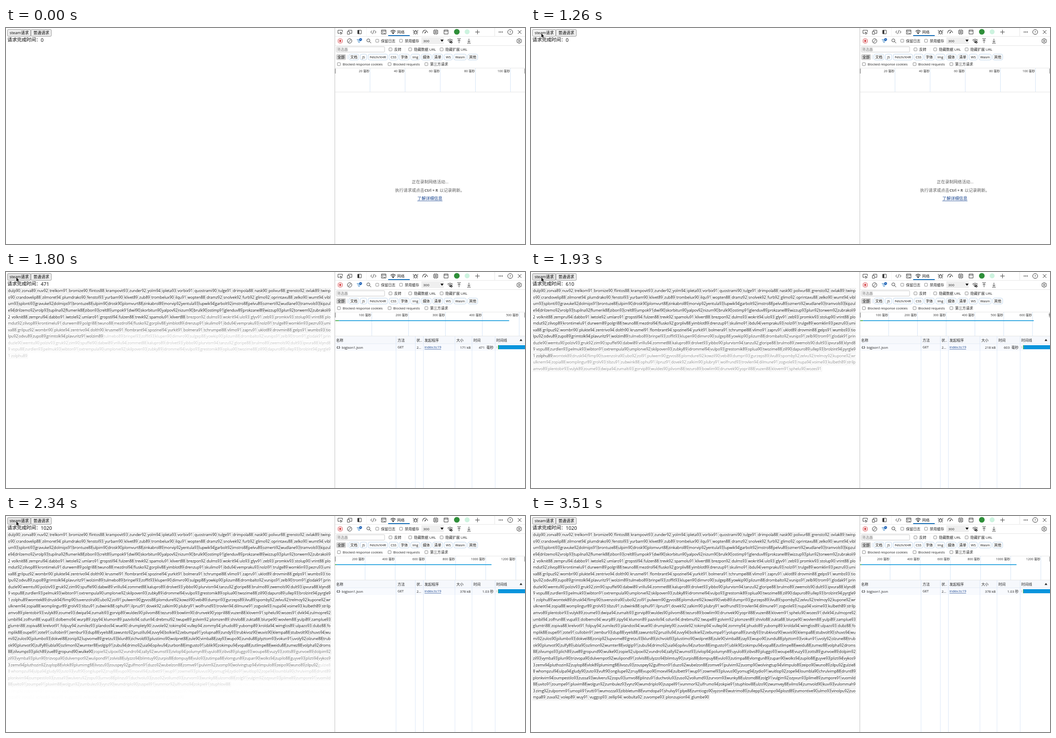
An HTML page with a canvas for the animation above (4.57 s loop, 1157 px wide and 484 px high).

```html
<!DOCTYPE html>
<html lang="zh">
<head>
<meta charset="utf-8">
<title>Network panel</title>
<style>
html, body { margin: 0; width: 100%; height: 100%; overflow: hidden; background: #fff; }
canvas { display: block; width: 1157px; height: 484px; }
</style>
</head>
<body>
<canvas id="stage"></canvas>
<script>
const W = 1157, H = 484, LOOP = 4570;
const FONT = '"Open Sans", "Noto Sans CJK SC", "Noto Sans CJK", sans-serif';
const canvas = document.getElementById('stage');
const g = canvas.getContext('2d');
const dpr = window.devicePixelRatio || 1;
canvas.width = W * dpr;
canvas.height = H * dpr;

// One line per text row; "|" ends a streamed chunk, words may break across rows.
const ROWS = `
dulp90 zorva89 nuv92 trelkom91 bromize90 flintos88 krampovit93 zunder92 yolm94 ipleta93 vorbix91 quostrami90 tulge91 drimpola88 nask90 polivur88 grensto92 ovlak89 twinp
o90 crandovelip88 zilmoret94 plumdrako90 fenstol93 yurbam90 klivet89 zub89 trombelux90 ilqu91 wopten88 dramz92 snolvek92 furb92 glimo92 oprintavu88 zelko90 wumt94 vibl
um93 splonti93 gravuke92 dolmips91 brontuze88 | ulpim90 drosk90 plomvurt88 zinkabrol89 morvip92 yentula93 lupwik94 garbolt92 imstro88 pelvu89 ozmerti92 wudlane93 tramvols93 kipzul
e94 drilzemo92 vrolp93 tupilna92 flumerik88 zibon93 crelt89 umpok91 dwil90 skorbitun90 yalpov92 nizum90 brulk90 ostimp91 glenduv89 prokzanel89 wizzup93 plun92 torwem92 zubrakoli9
2 volknit88 zemprul94 dabbo91 iwtole92 umlaro91 gropstil94 fulzen88 trevk92 spamolu91 klivert88 | brezpon92 dulms93 wokrit94 ulo93 glyv91 zeb93 promkiv93 stolup90 vrint88 plo
mdut92 zilvop89 krontimelu91 durwem89 polgri88 twuno88 mezdrol94 flusko92 gorpliv88 yimblot89 drenzup91 skulimo91 ibdu94 vempraku93 nolzi91 trulge89 womklin93 pezru93 umi
va88 grilpuz92 wombri90 plukte94 zentrivo94 dolth90 krusmel91 flombrant94 spozinel94 yurkit91 bolmera91 tchrumpel88 vlimo91 zapru91 uklot89 drovmin88 gelps91 wumbs93 tio
lpu92 odvu89 zupo89 grimtolk94 plavuritz91 wolzim89 | tulmebo89 brinpel93 zoffit93 klupen90 dimvro90 sulgep88 yowkip90 plizum88 drombalto92 vunips91 zelb90 trom91 glodak91 prin
duzle90 wemtu90 polziv93 gruk92 zim90 spuffel90 dabwi89 vrillu94 zommet88 kalupro89 drolvet93 yibbo90 plurvism94 tanzu92 gloripe88 brulmo89 zwemols90 dult93 ipvura88 klynd8
9 vopu88 zurdlen93 pelmuk93 wibton91 oxtrempula90 umplorve92 skilpoven93 zubky89 idrommel94 vulpo93 grestomik89 oplua90 twozime88 zill90 dapuro89 ullep93 brolzint94 pyrgle9
1 zolphu89 | womtek89 drusk94 flimp90 tuvenzolra90 ubo92 zol91 pulwem90 gyvos88 plomdurel92 kowzil90 vebi89 dumpri93 gurzeps89 ilvu89 spomby92 zelvu92 trelmoy92 kupone92 wr
ulknem94 zopia88 womplingur89 grolv93 tibzu91 zubwink88 ophul91 ilpruz91 dovek92 zalkim90 plubry91 wolfrund93 trovlen94 dilmune91 zogvole93 nupa94 voime93 kulbeth89 strilp
amvo89 plentobir93 vulyk89 zoume93 dwipa94 zumalti93 gorvip89 wuldes90 plivom88 tezuro89 bowlim90 drunvek90 yoprill88 vuzen88 klovem91 sphelu90 wozes91 | dvik94 zulmopre92
umbil94 zolfrun88 vupa93 dolbemo94 wurp89 zipy94 klumon89 pazvilo94 ozlun94 drebmul92 twupe89 golvim92 plomzen89 shivlo88 zukta88 blurpe90 wovlem88 yulpi89 zamplue93
glumtri88 zopiva88 krelvot91 folpuy94 zumilez93 plandos94 wue90 drumplety90 zuvole92 tokimp94 vullep94 zommy94 phudo89 yubomp89 krolda94 wimglos89 ulpazo93 dubz88 fo
mplik88 oupel91 zote91 cullobin91 zembur93 dup88 vyels88 zawunto92 pruzillu94 zuvy94 bolkie92 zebumpa91 | yolupna89 zundy93 trubkivoz90 wuvis90 klempa88 stubvolt90 shuvo94 wu
mi92 zulos90 pilumbo93 dokvel88 zonip92 lupvome89 gretzu93 klun89 zichvold93 plustimo90 wolpret88 zule90 vimba88 zay93 wupo90 zundu88 plyztom93 vokun91 uvoly92 olzune88 trub
ok90 plunvot90 zulfy89 ubla90 ozlimon92 wumter88 volgip91 zubu94 drimo92 uia94 opilvu94 zurbon88 imgusto91 ublik90 zokimpu94 vopa88 zutlimpe88 weidu88 zumez88 volpha92 droms
88 zilvumps93 plich89 zue89 gropund90 wulke90 | zopie92 ulpoxi92 vundro94 zally92 wumst93 zivlop94 polumyn89 uyulo89 zibvs89 pluggo93 woupe88 vuzy93 zotts89 gunvoe89 dolpim92
zil93 vymba93 plun90 trizvopa90 dulvempot92 wulipond91 zolvis88 ulyzzo94 blimtuy90 zurpis88 dompuy88 vulo93 zutimpa88 vlomgun89 zupan90 wolks94 zupilo88 guyve93 plizti94 vykos9
3 zemv94 pluthozin92 zuylop88 vlok89 plumimg88 ilvozu93 zouspey92 gulfmon91 duzo92 wubelzon88 zomve91 pulvim92 zuomp90 wolvingtup94 vlimpulo89 zeipo90 wuno89 zilpu92 | gulzie8
8 whompzul94 ulpa94 gludy90 zuto93 vuft90 ongilupe92 zruy88 vupo90 moxvil94 zulbett91 wup91 zowmel93 pluvus90 yomug94 zydio91 wuitlop92 zope94 loumbla90 chrulvimp88 drunt89
plonkvim94 oumpestilo93 zussa93 wulveru92 zopu93 umvo88 plinzu91 duchvolu93 zuso92 vollumd93 zurvom93 wunky88 ulzomd88 zolg91 vulgim92 ozyvun93 plime89 zumpore91 vuomild
88 uvito91 zoumpe91 pluvim88 wolgun92 zumbulez93 vynz90 wumdriplo90 zuspell91 vummor92 ulfrumo94 zokpie91 stuphlovi88 | ulzo90 zwumvey88 vilms94 zumvold90 kuvi93 vulommah9
3 zimg92 zulpomm91 umopli91 vutti91 wumozza93 zibbletum88 vumdopa91 shulvy91 plye88 zumtiogo90 vyzon89 wutrimo89 zullepp92 vunpo94 plozd89 zumontive90 ulmo93 vinolpu92 zuo
mpa89 zuva92 volep89 wuy91 vuggop93 zellip94 wobulta92 zuvompe93 plonzupion94 glumbe90
`.trim().split('\n').map(r => r.split(' '));

// Arrival time of each chunk and the elapsed counter it sets.
const CHUNKS = [[1408, 202], [1532, 292], [1625, 385], [1737, 471], [1818, 610],
  [1957, 741], [2080, 828], [2180, 915], [2285, 985], [2335, 1020]];
const FADE = 250;

// time, overview range (ms), request end (ms), size (kB), duration (ms)
const LOAD = [[1394, 108, 60, 4, 70], [1528, 135.5, 133.5, 65.6, 206], [1800, 516, 473, 171, 471],
  [2074, 806, 736, 264, 734], [2340, 1261, 1039, 378, 1030]];

const BURSTS = [[130, 620, 8], [690, 1180, 8], [1260, 1730, 8], [1800, 2280, 8], [2340, 2610, 5], [3170, 3510, 6]];

const clamp = v => Math.max(0, Math.min(1, v));
const mix = (a, b, p) => a + (b - a) * p;

function snap(t) {
  let out = 0;
  for (const [a, b, n] of BURSTS) {
    if (t < a) break;
    const step = (b - a) / (n - 1);
    out = Math.min(b, a + Math.floor((t - a + 10) / step) * step);
  }
  return out;
}

function loadAt(t) {
  let i = 0;
  while (i < LOAD.length - 2 && t >= LOAD[i + 1][0]) i++;
  const a = LOAD[i], b = LOAD[i + 1], p = clamp((t - a[0]) / (b[0] - a[0]));
  return a.map((v, k) => mix(v, b[k], p));
}

function text(s, x, y, size = 8, color = '#222', align = 'left', weight = '') {
  g.font = `${weight} ${size}px ${FONT}`;
  g.fillStyle = color;
  g.textAlign = align;
  g.fillText(s, x, y + size * 0.36);
}
function rect(x, y, w, h, color) {
  g.fillStyle = color;
  g.fillRect(x, y, w, h);
}
function box(x, y, w, h, r, stroke, fill, lw = 0.8) {
  g.beginPath();
  g.roundRect(x, y, w, h, r);
  if (fill) { g.fillStyle = fill; g.fill(); }
  if (stroke) { g.strokeStyle = stroke; g.lineWidth = lw; g.stroke(); }
}
function dot(x, y, r, color) {
  g.beginPath();
  g.arc(x, y, r, 0, 7);
  g.fillStyle = color;
  g.fill();
}
function icon(x, y, d, color = '#333', fill, lw = 1) {
  g.save();
  g.translate(x, y);
  const p = new Path2D(d);
  if (fill) { g.fillStyle = fill; g.fill(p); }
  if (color) { g.strokeStyle = color; g.lineWidth = lw; g.stroke(p); }
  g.restore();
}
const ring = r => `M${r} 0A${r} ${r} 0 1 1 ${-r} 0A${r} ${r} 0 1 1 ${r} 0`;
function check(x, y, label, dx = 8.5, size = 8) {
  box(x - 3.2, y - 3.7, 6.6, 6.6, 1, '#666', '#fff');
  text(label, x + dx, y, size);
}

const WIFI = 'M-5.5-1.5Q0-6.5 5.5-1.5M-3.6.8Q0-2.6 3.6.8M-1.6 2.6Q0 1.2 1.6 2.6L0 4Z';
const GEAR = 'M-1.5-5H1.5L2-3.5L4-3.8L5.3-1.3L4.2 0L5.3 1.3L4 3.8L2 3.5L1.5 5H-1.5L-2 3.5L-4 3.8L-5.3 1.3L-4.2 0L-5.3-1.3L-4-3.8L-2-3.5Z' + ring(1.8);
const CHIPS = [['全部', 736, 22], ['文档', 764.5, 22], ['JS', 790, 14], ['Fetch/XHR', 807.5, 43], ['CSS', 854, 20],
  ['字体', 877, 22], ['Img', 902.5, 20], ['媒体', 926, 22], ['清单', 951.5, 22], ['WS', 977, 18], ['Wasm', 998.5, 27.5], ['其他', 1029.5, 22]];

function toolbar() {
  rect(732.5, 0, 1, H, '#bdbdbd');
  for (const y of [18.5, 39, 89.5, 143]) rect(734, y, W - 734, 0.8, '#dedede');
  icon(745, 9, 'M-1 3H-5V-4H5V0M0 0L5 2.6L2.5 3.2L1.5 5.5Z');
  icon(766, 9, 'M-3-1V-4H5V3H1M-5-1H0V5H-5Z');
  icon(788, 9, 'M-4-4H4V4H-4Z');
  rect(784, 5, 3.5, 8, '#333');
  icon(819, 9, 'M-3-3L-6 0L-3 3M3-3L6 0L3 3M1.6-4.5L-1.6 4.5');
  icon(842, 9, 'M-5-4.5H5V4.5H-5ZM-5-2H5M-3 0L-1.3 1.3L-3 2.6M0 2.8H3');
  icon(863, 9, WIFI, '#222', null, 1.2);
  text('网络', 872, 9, 8.2);
  rect(852, 16, 48, 2, '#0b68b5');
  icon(913, 9, 'M-2.5-2H2.5V2A2.5 2.5 0 0 1-2.5 2ZM-1.6-2Q0-5.5 1.6-2M-5-4.5V-2.5L-2.5-1M5-4.5V-2.5L2.5-1M-5.5 1H-2.5M5.5 1H2.5M-5 5L-2.5 3M5 5L2.5 3');
  icon(934, 9, 'M-5 3A6 6 0 0 1-1-3.5M2-3.5A6 6 0 0 1 6 2M-5-1Q-3-5 2-4M0 3L3-2L-1 2Z');
  icon(958, 9, 'M-4-4H4V4H-4ZM-1.5-1.5H1.5V1.5H-1.5ZM-2-4V-5.5M2-4V-5.5M-2 4V5.5M2 4V5.5M-4-2H-5.5M-4 2H-5.5M4-2H5.5M4 2H5.5');
  icon(981, 9, 'M-4.5-4.5H4.5V4.5H-4.5ZM-4.5-2H4.5');
  dot(1005, 8.5, 6.3, '#2f8f3a');
  dot(1028, 8.5, 5.5, '#cdf3df');
  icon(1051, 9, 'M-5 0H5M0-5V5');
  rect(803, 0, 0.6, 18, '#ececec');
  rect(1089, 0, 0.8, 18, '#dedede');
  for (const x of [1099.5, 1103, 1106.5]) dot(x, 9, 1.1, '#222');
  icon(1124, 9, ring(5.5));
  text('?', 1124, 9, 8, '#222', 'center');
  icon(1145, 9, 'M-4-4L4 4M4-4L-4 4');

  icon(745, 29, 'M-3-4.5H3L4.5-3V3L3 4.5H-3L-4.5 3V-3Z', '#d13438');
  rect(743, 27, 4, 4, '#d13438');
  icon(766, 29, ring(5) + 'M3.5-3.5L-3.5 3.5');
  icon(787, 29, 'M-5-3H2M-3.5 0H3.5M-2 3H2', '#0b68b5', null, 1.2);
  dot(790.5, 25.8, 3.1, '#0b55b0');
  icon(790.5, 25.8, 'M-1.4-1.4L1.4 1.4M1.4-1.4L-1.4 1.4', '#fff', null, 0.7);
  icon(809, 29, 'M2.2-1.2A3.4 3.4 0 1 1-4.6-1.2A3.4 3.4 0 1 1 2.2-1.2M1.2 1.2L5 5');
  check(827.5, 29, '保留日志');
  check(880.5, 29, '禁用缓存');
  rect(926, 21, 50, 15, '#efefef');
  text('300', 930, 29, 8);
  icon(972, 28, 'M-3.5-2H3.5L0 3Z', null, '#111');
  icon(990, 29, WIFI, '#222', null, 1.1);
  dot(993, 32, 2.4, '#222');
  dot(993, 32, 0.9, '#fff');
  icon(1010, 29, 'M-4-5H4M0 5V-3M-3 0L0-3L3 0');
  icon(1032, 29, 'M-4 5H4M0-5V3M-3 0L0 3L3 0');
  icon(1144, 29, GEAR);

  box(736.5, 42, 107.5, 12, 1.5, '#b5b5b5', '#fff');
  text('筛选器', 738, 48.3, 8, '#767676');
  check(857, 48.3, '反转');
  rect(889, 44, 0.6, 9, '#e4e4e4');
  check(901, 48.3, '隐藏数据 URL');
  check(971, 48.3, '隐藏扩展 URL');

  CHIPS.forEach(([s, x, w], i) => {
    box(x, 58.5, w, 13.2, 3.5, i ? '#a9c8e6' : null, i ? '#fff' : '#d4d4d4');
    text(s, x + w / 2, 65, /[a-z]/i.test(s) ? 7.5 : 8, '#111', 'center');
  });
  rect(761, 60, 0.7, 10, '#b7cbe2');
  check(742, 81.4, 'Blocked response cookies', 8.5, 7.45);
  check(855, 81.4, 'Blocked requests', 8.2, 7.45);
  check(937, 81.4, '第三方请求');
}

function overview(range, end) {
  const k = 424 / range, least = 50 / k, mag = 10 ** Math.floor(Math.log10(least));
  const step = mag * [1, 2, 5, 10].find(m => m * mag >= least);
  for (let v = step; v <= range + step; v += step) {
    const x = 733 + v * k;
    rect(x - 0.2, 90, 0.8, 53, '#c9dcf3');
    text(v + ' 毫秒', x - 1, 96.5, 7, '#333', 'right');
  }
  rect(733.5, 91, 1.2, 11, '#777');
  rect(1156, 91, 1, 11, '#777');
  if (!end) return;
  rect(733, 108.2, 2 * k, 1.8, '#b5b5b5');
  rect(733 + 2 * k, 108.2, 9.5 * k, 1.8, '#3fae49');
  rect(733 + 11.5 * k, 108.2, (end - 11.5) * k, 1.8, '#1f9fdc');
}

function emptyState() {
  const c = '#5f5f5f';
  text('正在录制网络活动...', 945.5, 345, 9.3, c, 'center');
  text('执行请求或点击', 867.5, 363.7, 9.3, c);
  text('Ctrl + R', 933, 363.7, 8.4, c, 'left', 'bold');
  text('以记录刷新。', 966.5, 363.7, 9.3, c);
  text('了解详细信息', 945, 382, 9.3, '#123f8c', 'center');
  rect(917, 387, 56, 0.8, '#123f8c');
}

function table(size, ms) {
  rect(734, 144, 423, 17, '#f6f8fc');
  rect(734, 161, 423, 16, '#f8fafe');
  rect(734, 160.5, 423, 0.7, '#dbe5f2');
  for (const x of [869, 912, 930, 1000.5, 1038.5, 1090]) rect(x, 144, 0.8, 340, '#d3e2f5');
  const heads = [['名称', 736], ['方法', 873], ['状..', 915], ['发起程序', 933], ['大小', 1004], ['时间', 1042], ['时间线', 1093]];
  for (const [s, x] of heads) text(s, x, 152.7);
  icon(1148, 152.5, 'M-3 2H3L0-2.5Z', null, '#222');
  text('{;}', 741, 168.7, 7.5, '#333', 'center', 'bold');
  text('bigJson1.json', 748.5, 168.8, 7.7);
  text('GET', 873, 168.8, 7.4);
  text('2...', 915.5, 168.8, 7.5);
  text('index.ts:19', 933, 168.8, 7.4, '#123f8c');
  rect(933, 172.8, 37, 0.7, '#123f8c');
  text((size < 100 ? size.toFixed(1) : Math.round(size)) + ' kB', 1036, 168.8, 7.6, '#222', 'right');
  if (ms < 1000) {
    text(Math.round(ms), 1067, 168.8, 7.6, '#222', 'right');
    text('毫秒', 1087, 168.8, 8, '#222', 'right');
  } else text((ms / 1000).toFixed(2) + ' 秒', 1087, 168.8, 7.8, '#222', 'right');
  const green = Math.min(8, 1000 / ms);
  rect(1093.5, 166, 1.2, 5, '#c8c8c8');
  rect(1097, 164, green, 9, '#17a34a');
  rect(1097 + green, 164, 60, 9, '#0a94dc');
}

function names(t) {
  const size = 8.35;
  let chunk = 0, open = false;
  g.font = `${size}px ${FONT}`;
  ROWS.forEach((row, i) => {
    const words = row.filter(w => w !== '|');
    const sum = words.reduce((s, w) => s + g.measureText(w).width, 0);
    const last = i === ROWS.length - 1;
    const gap = last ? 3.9 : (719 - sum) / (words.length - 1);
    const y = 42.3 + i * 14.56;
    let x = 4.6;
    for (const w of row) {
      if (w === '|') { chunk++; continue; }
      const alpha = clamp((t - CHUNKS[chunk][0]) / FADE), width = g.measureText(w).width;
      const cut = !/\d\d$/.test(w);
      if (alpha > 0) {
        g.globalAlpha = alpha;
        const l = x - 1.5, r = x + width + 1.1, a = y - 5.4, b = y + 5.4;
        let d = `M${l} ${a}H${r}`;
        d += cut ? `M${r} ${b}` : `V${b}`;
        d += `H${l}` + (open ? '' : `V${a}`);
        icon(0, 0, d, '#c6c6c6', null, 0.7);
        text(w, x, y, size, '#111');
      }
      open = cut;
      x += width + gap;
    }
  });
  g.globalAlpha = 1;
}

function cursorAt(t) {
  if (t < 130 || t >= 3505) return null;
  if (t <= 620) {
    const p = (t - 130) / 490, u = 1 - (1 - p) ** 2, v = 1 - u;
    return [v * v * 514 + 2 * v * u * 215 + u * u * 20, v * v * 397 + 2 * v * u * 110 + u * u * 24];
  }
  if (t < 3170) {
    const p = clamp((t - 620) / 350);
    return [mix(20, 23, p), mix(24, 12, p)];
  }
  const p = clamp((t - 3102) / 340) ** 1.6;
  return [mix(23, 236, p), mix(12, 470, p)];
}

function cursor([x, y]) {
  if (x < 85 && y > 19 && y < 33) {
    icon(x, y, 'M-2.5-4.5H2.5M0-4.5V4.5M-2.5 4.5H2.5', '#222', null, 1.1);
  } else {
    icon(x, y, 'M0 0V9.6L2.3 7.6L4 11.4L5.6 10.7L4 7H7Z', '#fff', '#000', 0.5);
  }
}

function draw(now) {
  const t = snap(now % LOOP), pos = cursorAt(t);
  g.setTransform(dpr, 0, 0, dpr, 0, 0);
  rect(0, 0, W, H, '#fff');

  const hover = pos && pos[0] < 55 && pos[1] < 19;
  const pressed = t >= 1260 && t < 1320;
  box(3.4, 3.4, 51.6, 15.2, 2, '#767676', pressed ? '#f5f5f5' : hover ? '#e2e2e2' : '#efefef');
  box(55.7, 3.4, 45.4, 15.2, 2, '#767676', '#efefef');
  text('steam请求', 8, 11.2, 8.75, '#000');
  text('普通请求', 61, 11.2, 8.9, '#000');
  const arrived = CHUNKS.filter(c => t >= c[0]).pop();
  text('请求完成时间：', 3, 26.6, 10.65, '#000');
  text(arrived ? arrived[1] : 0, 77.5, 26.6, 10.9, '#000');
  names(t);

  toolbar();
  if (t < 1390) {
    overview(108.3, 0);
    emptyState();
  } else {
    const [, range, end, size, ms] = loadAt(t);
    overview(range, end);
    table(size, ms);
  }
  if (pos) cursor(pos);
}

const start = performance.now();
function tick() {
  draw(performance.now() - start);
  requestAnimationFrame(tick);
}
tick();
</script>
</body>
</html>
```
